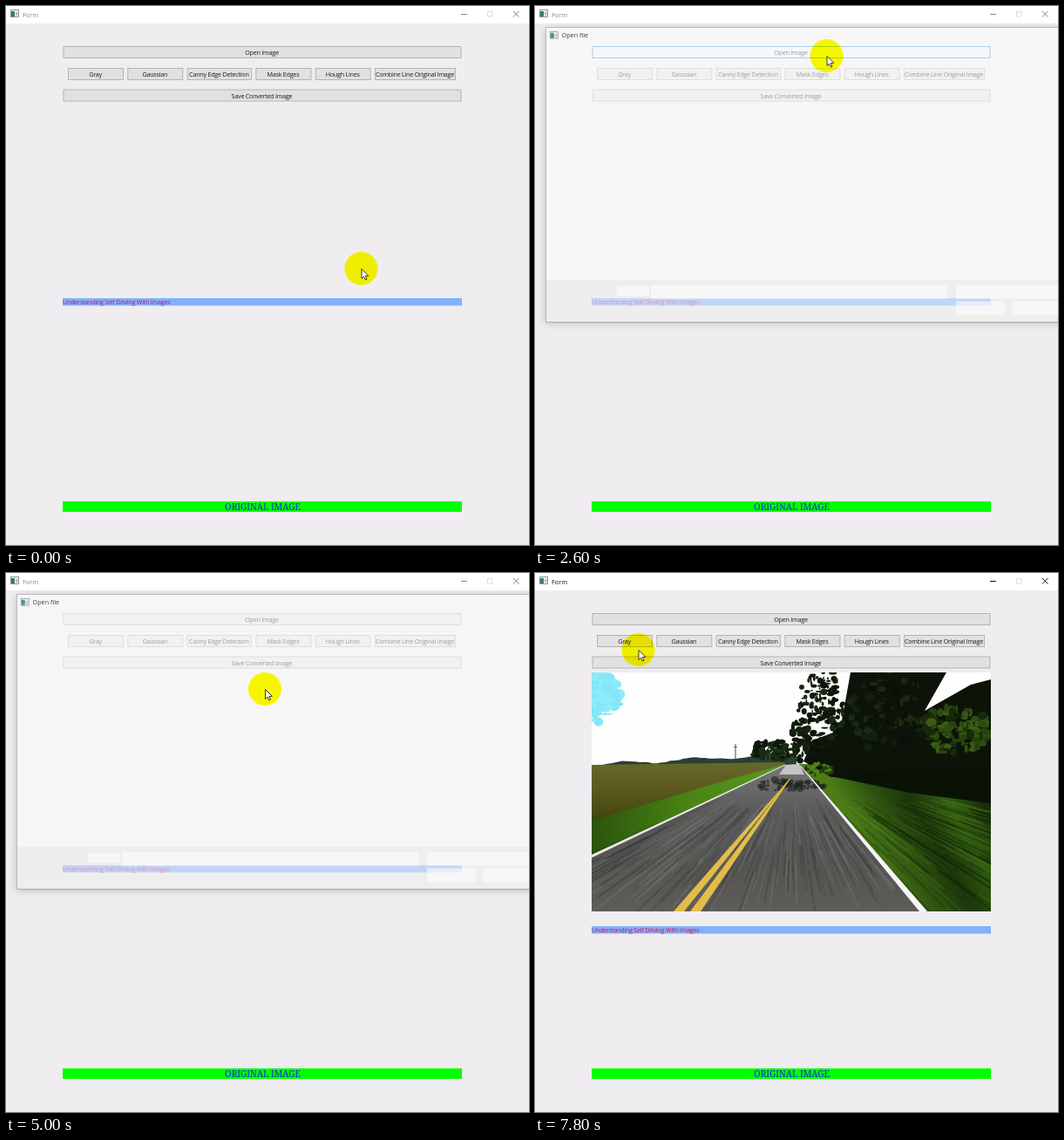
Animation of 600 by 618 pixels, one loop 8 s. Source, as an HTML page with a canvas:

```html
<!DOCTYPE html>
<html lang="tr">
<head>
<meta charset="utf-8">
<style>
html, body { margin: 0; width: 600px; height: 618px; overflow: hidden; background: #efedef; }
canvas { display: block; }
</style>
</head>
<body>
<canvas id="stage" width="600" height="618"></canvas>
<script>
const LOOP = 8000, STEP = 200;
const PRESS = 2000, OPEN = 2600, READY = 2800, FOLDER = 3800, CLOSE = 5000, LOADED = 5200;
const SANS = '"Open Sans", "Noto Sans", sans-serif';
const INK = '#1c1c1c', PROJECT = 'Road_Tracing_Kit';
const ctx = document.getElementById('stage').getContext('2d');

// Pointer moves: start time, end time, x, y to reach
const HOME = [407.5, 301];
const MOVES = [
  [0, 200, 371, 284], [200, 400, 338, 212], [400, 800, 336.5, 60], [800, 1200, 334.5, 57],
  [2800, 3200, 126, 160], [3200, 3600, 68, 209], [3800, 4400, 235.5, 143], [4400, 4800, 297, 133],
  [5200, 5800, 231, 139], [5800, 6600, 104, 72], [6800, 7800, 118.5, 88]
];
const FILTERS = [
  ['Gray', 63], ['Gaussian', 63], ['Canny Edge Detection', 73.5], ['Mask Edges', 63],
  ['Hough Lines', 63], ['Combine Line Original Image', 92]
];
const FILES = `$QV_TRW|22.12.2017 14:51
TNQ|18.09.2019 19:00
Plinvara|14.07.2018 18:12
AX NF ZZ|6.02.2019 14:16
BIOS|13.11.2017 15:26
EFSTMPWP|7.01.2018 22:35
Morvi|26.08.2019 08:50
JRI|27.11.2017 15:39
Kullanıcılar|18.09.2019 19:03
PerfLogs|19.03.2019 07:52
Program Dosyaları (x86)|25.09.2019 23:47
Program Files|18.09.2019 19:44
Tarnic35|22.09.2019 07:40
QualityStats|26.12.2017 17:47
Sorvane|20.09.2019 15:19`.split('\n').map(s => s.split('|'));
const PLACES = [
  ['Hızlı erişim', 'star'], ['Belgeler', 'doc'], ['İndirilenler', 'down'], ['Resimler', 'pic'],
  ['CV zartzurt', 'folder'], ['Pixel_Reworker', 'folder'], ['Masaüstü', 'desk'], [PROJECT, 'folder'],
  ['HazeVault', 'cloud'], ['Bu bilgisayar', 'pc'], ['Ağ', 'net']
];

function pointer(t) {
  let [x, y] = HOME;
  for (const [from, to, tx, ty] of MOVES) {
    const f = Math.min(1, Math.max(0, (t - from) / (to - from))), e = f * f * (3 - 2 * f);
    x += (tx - x) * e;
    y += (ty - y) * e;
  }
  return [x, y];
}

function rect(x, y, w, h, fill, stroke, lw = 1) {
  if (fill) { ctx.fillStyle = fill; ctx.fillRect(x, y, w, h); }
  if (stroke) { ctx.strokeStyle = stroke; ctx.lineWidth = lw; ctx.strokeRect(x, y, w, h); }
}

function trace(g, p) {
  g.beginPath();
  for (let i = 0; i < p.length; i += 2) g.lineTo(p[i], p[i + 1]);
}

function poly(g, fill, ...p) { trace(g, p); g.fillStyle = fill; g.fill(); }

function line(color, lw, ...p) { trace(ctx, p); ctx.strokeStyle = color; ctx.lineWidth = lw; ctx.stroke(); }

function disc(g, fill, x, y, rx, ry = rx) {
  g.beginPath(); g.ellipse(x, y, rx, ry, 0, 0, 7); g.fillStyle = fill; g.fill();
}

// y is the middle of the capitals; returns the width
function text(s, x, y, color = INK, size = 7.4, align = 'left', spacing = 0, family = SANS) {
  ctx.font = size + 'px ' + family;
  ctx.letterSpacing = spacing + 'px';
  ctx.textAlign = align;
  ctx.fillStyle = color;
  ctx.fillText(s, x, y + size * 0.36);
  return ctx.measureText(s).width;
}

function chevron(x, y, down, color = '#555') {
  ctx.save();
  ctx.translate(x, y);
  if (down) ctx.rotate(Math.PI / 2);
  line(color, 0.9, -1.2, -2.4, 1.2, 0, -1.2, 2.4);
  ctx.restore();
}

function arrow(x, y, angle, color) {
  ctx.save();
  ctx.translate(x, y);
  ctx.rotate(angle);
  line(color, 1.1, -3.5, 0, 3.5, 0);
  line(color, 1.1, 0.5, -3, 3.5, 0, 0.5, 3);
  ctx.restore();
}

function gradient(g, x0, y0, x1, y1, ...colors) {
  const r = g.createLinearGradient(x0, y0, x1, y1);
  colors.forEach((c, i) => r.addColorStop(i / (colors.length - 1), c));
  return r;
}

function makePhoto() {
  const c = document.createElement('canvas');
  c.width = 458; c.height = 274;
  const g = c.getContext('2d');
  let seed = 7;
  const rnd = () => (seed = seed * 16807 % 2147483647) / 2147483647;
  // loose crown of leaves, thinning towards its rim
  const crown = (n, x, y, rx, ry, size, ...colors) => {
    for (let i = 0; i < n; i++) {
      const a = rnd() * 7, r = Math.sqrt(rnd());
      disc(g, colors[i % colors.length], x + rx * r * Math.cos(a), y + ry * r * Math.sin(a), 0.7 + rnd() * size, 0.7 + rnd() * size * 0.8);
    }
  };
  // motion blur running out from the vanishing point
  const streaks = (n, x0, x1, color) => {
    g.strokeStyle = color;
    for (let i = 0; i < n; i++) {
      const x = x0 + (x1 - x0) * rnd(), a = 0.25 + rnd() * 0.5, b = a + 0.15 + rnd() * 0.2;
      g.lineWidth = 0.5 + rnd() * 2;
      g.beginPath();
      g.moveTo(295 + (x - 295) * a, 216 + 172 * a);
      g.lineTo(295 + (x - 295) * b, 216 + 172 * b);
      g.stroke();
    }
  };
  g.translate(-65, -114);
  g.fillStyle = '#fefefe';
  g.fillRect(65, 114, 458, 274);
  crown(120, 65, 142, 32, 30, 8, '#8cecfa', '#84e6f8');

  g.beginPath();
  g.moveTo(65, 230);
  for (let x = 65; x <= 300; x += 5) g.lineTo(x, 221 - (x - 65) / 18 - 2 * Math.sin(x / 13) - rnd() * 2);
  g.lineTo(300, 230);
  g.fillStyle = '#2a4034';
  g.fill();
  poly(g, gradient(g, 0, 218, 0, 300, '#66682a', '#5c5a1e', '#4a4c14', '#24380a'), 65, 220, 285, 217, 288, 222, 65, 326);
  poly(g, gradient(g, 65, 0, 290, 0, '#2c540c', '#4a8414', '#5c9a24'), 65, 284, 225, 236, 288, 219, 65, 327);
  poly(g, gradient(g, 375, 305, 500, 235, '#4c7c18', '#2e5410', '#1c360a', '#305c10', '#182c08'), 303, 219, 523, 219, 523, 388, 448, 388);
  streaks(120, 470, 1000, 'rgba(90,140,30,.22)');
  streaks(120, 450, 1000, 'rgba(5,15,0,.22)');

  poly(g, gradient(g, 0, 219, 0, 388, '#777', '#5a5a5a', '#545452', '#5e5c58'), 65, 326, 286, 220, 304, 219, 448, 388, 65, 388);
  streaks(130, -40, 440, 'rgba(150,150,145,.16)');
  streaks(130, -90, 440, 'rgba(20,20,20,.16)');
  poly(g, '#c4c4c4', 288, 220, 303, 219, 309, 231, 280, 231);
  crown(70, 292, 243, 40, 7, 4, 'rgba(34,36,32,.6)');

  poly(g, '#0c140a', 362, 114, 472, 114, 447, 158, 500, 128, 523, 122, 523, 240, 340, 234, 308, 216, 318, 192, 350, 180);
  poly(g, '#0a1206', 335, 232, 523, 220, 523, 264, 430, 252);
  crown(190, 328, 158, 26, 52, 4, '#10190c', '#0c140a', '#1a2a12');
  crown(120, 275, 203, 28, 11, 4, '#0e180c', '#1a2e12');
  crown(60, 304, 190, 10, 26, 4, '#0e180c', '#142010');
  crown(100, 405, 160, 45, 50, 5, '#14200e', '#0a1008', '#1a2a10');
  crown(150, 482, 180, 40, 27, 6, '#2e4c10', '#18290a', '#26420e', '#3a5c14');
  crown(40, 325, 225, 16, 7, 3, '#4c8218', '#223c0c');

  poly(g, '#e8e8e8', 65, 323, 287, 219.5, 288, 220, 65, 326.5);
  poly(g, '#f6f6f6', 304, 221, 305, 221, 450, 388, 441, 388);
  for (const x of [159, 178]) poly(g, '#e2bd48', x, 388, 292, 236, 293, 236, x + 12, 388);
  g.fillStyle = '#444';
  g.fillRect(229.5, 196, 1, 19);
  g.fillRect(228, 199, 4, 0.7);
  return c;
}
const photo = makePhoto();

function thumb(x, sky, hill, land, road) {
  ctx.save();
  ctx.translate(x, 114.5);
  rect(0, 0, 60, 34, gradient(ctx, 0, 0, 0, 17, ...sky));
  poly(ctx, hill, 0, 15, 10, 10, 22, 14, 34, 10, 48, 13, 60, 11, 60, 20, 0, 20);
  rect(0, 17, 60, 17, land);
  poly(ctx, road, 28, 17, 33, 17, 56, 34, 5, 34);
  line('#e8e8e8', 0.7, 5, 34, 28, 17);
  line('#e8e8e8', 0.7, 56, 34, 33, 17);
  line('#f0c020', 1.3, 30, 34, 30.5, 17);
  ctx.restore();
}

function appIcon(x, y) {
  rect(x + 0.5, y + 0.5, 9, 8, '#f4f7f8', '#8b979b');
  rect(x + 1, y + 2, 4, 6, '#357a78');
  rect(x + 6, y + 3, 2.5, 4, '#b8c4c8');
}

const ICONS = {
  folder() {
    rect(-4, -4.5, 6, 9, '#e8bd48');
    rect(-3.5, -3.5, 8, 8, '#f8dc80');
    rect(-1, 1, 3, 2, '#e6c25c');
  },
  star() {
    const p = [];
    for (let i = 0; i < 10; i++) {
      const r = i % 2 ? 2 : 5, a = i * Math.PI / 5 - Math.PI / 2;
      p.push(r * Math.cos(a), r * Math.sin(a));
    }
    poly(ctx, '#2e8bd8', ...p);
  },
  down() { poly(ctx, '#2a78c0', -2, -5, 2, -5, 2, 0, 5, 0, 0, 5, -5, 0, -2, 0); },
  doc() {
    rect(-3.5, -4.5, 7, 9, '#fff', '#7c8a94', 0.8);
    for (let i = -2; i < 4; i += 2) line('#5c90b8', 0.7, -2, i, 2, i);
  },
  pic() {
    rect(-4.5, -3.5, 9, 7, '#fff', '#7c8a94', 0.8);
    poly(ctx, '#4a9ad0', -4, 3, -1, -1, 4, 3);
  },
  cloud() { disc(ctx, '#0a68b8', 0, 0, 4); },
  desk() { rect(-5, -3.5, 10, 7, '#1c9cc8', '#1a5c88', 0.8); },
  pc() {
    rect(-5, -4, 10, 6, '#58bce8', '#3a6c88', 0.8);
    rect(-3, 3.3, 6, 1.2, '#4c6470');
  },
  net() {
    rect(-4, -3, 6, 6, '#3c98d0');
    poly(ctx, '#2c6c9c', 0, -5, 5, -1, 1, 4);
  }
};

function icon(kind, x, y) {
  ctx.save();
  ctx.translate(x, y);
  ICONS[kind]();
  ctx.restore();
}

function button(label, x, y, w, t, mx, my) {
  const free = t < READY || t >= LOADED;
  const over = free && mx > x && mx < x + w && my > y && my < y + 13.5;
  const down = over && t >= PRESS && t < PRESS + 2 * STEP;
  rect(x, y, w, 13, down ? '#cce4f7' : over ? '#e5f1fb' : '#e1e0e2', over ? '#3c90d8' : '#b4b3b5');
  text(label, x + w / 2 - 0.5, y + 7, INK, 7.2, 'center', -0.25);
}

function form(t, mx, my) {
  const loaded = t >= LOADED, active = loaded || (t >= PRESS && t < OPEN);
  const ink = active ? '#111' : '#888';
  rect(0, 0, 600, 618, '#efedef');
  rect(0, 0, 600, 20, '#fff');
  appIcon(5, 4);
  text('Form', 19, 10, ink);
  line(ink, 1, 522, 9.5, 529, 9.5);
  rect(552.5, 6.5, 5.5, 5.5, null, '#dcdcdc');
  line(ink, 1, 582, 6, 588.5, 12.5);
  line(ink, 1, 588.5, 6, 582, 12.5);

  button('Open Image', 66, 46.5, 456, t, mx, my);
  let x = 71.5;
  for (const [label, w] of FILTERS) {
    button(label, x, 71.5, w, t, mx, my);
    x += w + 5.3;
  }
  button('Save Converted Image', 66, 96, 456, t, mx, my);

  if (loaded) ctx.drawImage(photo, 65, 114);
  const by = loaded ? 405 : 335;
  rect(65, by, 458, 8.5, '#80b2ff');
  text('Understanding Self Driving With Images', 65, by + 4.8, loaded ? '#f00a46' : '#c8146e', 7.2, 'left', -0.25);
  rect(65, 568, 458, 12, '#00ff00');
  text('ORIGINAL IMAGE', 294.5, 574.2, '#1424e0', 10.2, 'center', 0, '"Noto Serif", serif');
}

function sidebar(t, inFolder, mx, my) {
  PLACES.forEach(([label, kind], i) => {
    const top = i === 0 || i > 7, x = top ? 35 : 40;
    const y = i < 8 ? 101 + i * 15.65 : 231.5 + (i - 8) * 20.8;
    const over = mx < 107 && Math.abs(my - y) < 7;
    const chosen = label === (inFolder ? PROJECT : 'Bu bilgisayar');
    if (chosen) rect(6, y - 7.5, 101, 15, inFolder ? '#cfe8fc' : '#d9d9d9');
    else if (over) rect(6, y - 7.5, 101, 15, '#e5f3fb');
    icon(kind, top ? 26.5 : 31, y);
    text(label, x, y);
    if (top && t >= 3400) chevron(12, y, i === 0);
    if (i > 0 && i < 4) {
      line('#7c848a', 1, 98.5, y + 3, 101, y);
      line('#7c848a', 2.4, 100.5, y + 0.5, 103, y - 2);
    }
  });
}

function fileList(mx, my) {
  const heads = { 'Ad': 121, 'Değiştirme tarihi': 291, 'Tür': 385, 'Boyut': 463 };
  for (const h in heads) {
    text(h, heads[h], 91, '#56606c');
    if (h !== 'Ad') line('#e4e4e4', 1, heads[h] - 4, 83, heads[h] - 4, 98);
  }
  line('#e4e4e4', 1, 511, 83, 511, 98);
  line('#666', 0.8, 199.5, 85.5, 202, 83, 204.5, 85.5);
  FILES.forEach(([name, date], i) => {
    const y = 110 + i * 13.65;
    if (mx > 122 && mx < 509 && Math.abs(my - y) < 6.8) rect(122, y - 6.5, 387, 13, '#e4f1f6');
    icon('folder', 126.5, y);
    text(name, 134.5, y);
    text(date, 291, y, '#6c6c70');
    text('Dosya klasörü', 385, y, '#6c6c70');
  });
}

const tileAt = (mx, my) => my > 87 && my < 161 ? Math.floor((mx - 119) / 72) : -1;

function thumbs(t, mx, my) {
  const tile = tileAt(mx, my);
  if (tile >= 0 && tile < 3) rect(119 + tile * 72, 87, 68, 74, t > 4800 ? '#cce8ff' : '#e6f2f8');
  thumb(122.5, ['#59636a', '#a8a49c'], '#252c28', '#45421c', '#3e3e3c');
  thumb(194, ['#2c80cc', '#e8f2fa', '#b8d8ee'], '#5c6c70', '#8c7c58', '#747880');
  ctx.drawImage(photo, 266, 114.5, 59.5, 34);
  for (let i = 0; i < 3; i++) text('test_' + (i + 2), 153 + i * 72, 156, INK, 7.4, 'center');
}

function addressBar(inFolder) {
  arrow(17.5, 51, Math.PI, inFolder ? '#333' : '#c4c4c4');
  arrow(34, 51, 0, '#c4c4c4');
  chevron(52, 51, true, '#888');
  arrow(66, 51, -Math.PI / 2, '#333');
  rect(74.5, 43.5, 399, 15, '#fff', '#dadada');
  icon(inFolder ? 'folder' : 'pc', 81, 51);
  const crumbs = inFolder ? ['Bu bilgisayar', 'Masaüstü', 'Gui_Projects', PROJECT] : ['Bu bilgisayar', 'Yerel Disk (C:)', ''];
  let x = 93;
  for (const s of crumbs) {
    chevron(x, 51);
    x += 14 + text(s, x + 7, 51);
  }
  chevron(454, 51, true);
  line('#dadada', 1, 460, 44, 460, 58);
  ctx.beginPath();
  ctx.arc(467, 51, 2.7, -0.6, 4.6);
  ctx.strokeStyle = '#444';
  ctx.lineWidth = 1;
  ctx.stroke();
  poly(ctx, '#444', 466.5, 46.5, 469.5, 48.5, 466.5, 50);
  rect(481.5, 43.5, 140, 15, '#fff', '#dadada');
  text('Ara: ' + (inFolder ? PROJECT : 'Yerel Disk (C:)'), 487, 51, '#777');
}

function toolbar(inFolder) {
  rect(6, 63, 607, 19, '#f5f6f7');
  text('Düzenle', 16, 72.5, '#1e395b');
  text('Yeni klasör', 73, 72.5, '#1e395b');
  for (const x of [48, 558]) poly(ctx, '#333', x, 71, x + 5, 71, x + 2.5, 74);
  if (inFolder) rect(542.5, 69, 8, 6, '#3c8cc8', '#88949c');
  else for (let y = 69; y < 76; y += 2.7) {
    rect(541, y, 3, 1.6, '#7c8890');
    line('#9aa4aa', 0.8, 546, y + 0.8, 552, y + 0.8);
  }
  rect(577, 69, 10, 7, '#fff', '#5c7c94');
  rect(582.5, 69.5, 4.5, 6, '#4aa0dc');
}

function footer(inFolder) {
  text('Dosya adı:', 125, 330.5, INK, 7.4, 'right');
  rect(128.5, 323.5, 350, 14.5, '#fff', inFolder ? '#8c8c8c' : '#2c84cc');
  if (!inFolder) rect(131, 333, 1, 1, '#333');
  chevron(473, 331, true);
  rect(487.5, 323.5, 130, 14.5, '#e3e2e4', '#b0b0b0');
  ctx.save();
  ctx.beginPath();
  ctx.rect(488, 320, 109.5, 20);
  ctx.clip();
  text('Image files (*.jpg *.gif *.jpeg *.png)', 490, 331);
  ctx.restore();
  rect(488.5, 343.5, 55, 13.5, '#e1e1e1', '#1c7cd0', 1.6);
  text('Aç', 516, 350.5, INK, 7.4, 'center');
  rect(553, 343.5, 55, 13.5, '#e1e1e1', '#b0b0b0');
  text('İptal', 580.5, 350.5, INK, 7.4, 'center');
}

function dialog(t, mx, my) {
  const fading = t < READY || t >= CLOSE, inFolder = t >= FOLDER;
  ctx.save();
  if (fading) {
    ctx.translate(309, 193);
    ctx.scale(0.977, 0.977);
    ctx.translate(-309, -193);
    ctx.globalAlpha = 0.58;
  }
  // shadow only outside the window, so it never shows through
  ctx.save();
  ctx.beginPath();
  ctx.rect(-50, -50, 750, 700);
  ctx.rect(5, 20, 608, 346);
  ctx.clip('evenodd');
  ctx.shadowColor = 'rgba(0,0,0,.4)';
  ctx.shadowBlur = 9;
  ctx.shadowOffsetY = 2;
  rect(5, 20, 608, 346, '#fff');
  ctx.restore();
  rect(5, 20, 608, 297, '#fefefe');
  rect(5, 317, 608, 49, '#f0eff0');
  rect(5.5, 20.5, 607, 346, null, '#8e8e8e');
  if (fading) {
    rect(89, 324, 38, 11, '#fff');
    for (const [x, y, w] of [[129, 323, 348], [487, 323, 120], [487, 342, 57], [553, 342, 60]]) rect(x, y, w, 16, '#fff');
    ctx.globalAlpha = 0.85;
  }
  appIcon(10, 25);
  text('Open file', 24, 30);
  if (!fading) {
    addressBar(inFolder);
    toolbar(inFolder);
    sidebar(t, inFolder, mx, my);
    line('#f0f0f0', 1, 107.5, 83, 107.5, 317);
    if (inFolder) thumbs(t, mx, my); else fileList(mx, my);
    footer(inFolder);
  }
  ctx.restore();
}

function cursor(t, x, y) {
  ctx.save();
  ctx.globalCompositeOperation = 'multiply';
  disc(ctx, '#ffff00', x, y, 19);
  ctx.restore();
  // the middle preview turns blue under the highlight
  if (t >= FOLDER && t < CLOSE && tileAt(x, y) === 1) {
    ctx.save();
    ctx.beginPath();
    ctx.arc(x, y, 19, 0, 7);
    ctx.clip();
    poly(ctx, '#2010c8', 222, 131.5, 227, 131.5, 250, 148.5, 199, 148.5);
    line('#f0e020', 1.3, 224, 148.5, 224.5, 131.5);
    ctx.restore();
  }
  ctx.save();
  ctx.translate(x + 0.5, y + 0.5);
  trace(ctx, [0, 0, 0, 11, 2.5, 8.7, 4.3, 12.5, 6, 11.7, 4.3, 8, 7.8, 7.8]);
  ctx.closePath();
  ctx.fillStyle = '#fff';
  ctx.fill();
  ctx.strokeStyle = '#222';
  ctx.lineWidth = 0.9;
  ctx.stroke();
  ctx.restore();
}

function draw(now) {
  const t = Math.floor(now % LOOP / STEP) * STEP;
  const [x, y] = pointer(t);
  form(t, x, y + 1);
  if (t >= OPEN && t < LOADED) dialog(t, x, y + 1);
  cursor(t, x, y);
}

const start = performance.now();
function frame() {
  draw(performance.now() - start);
  requestAnimationFrame(frame);
}
frame();
</script>
</body>
</html>
```
